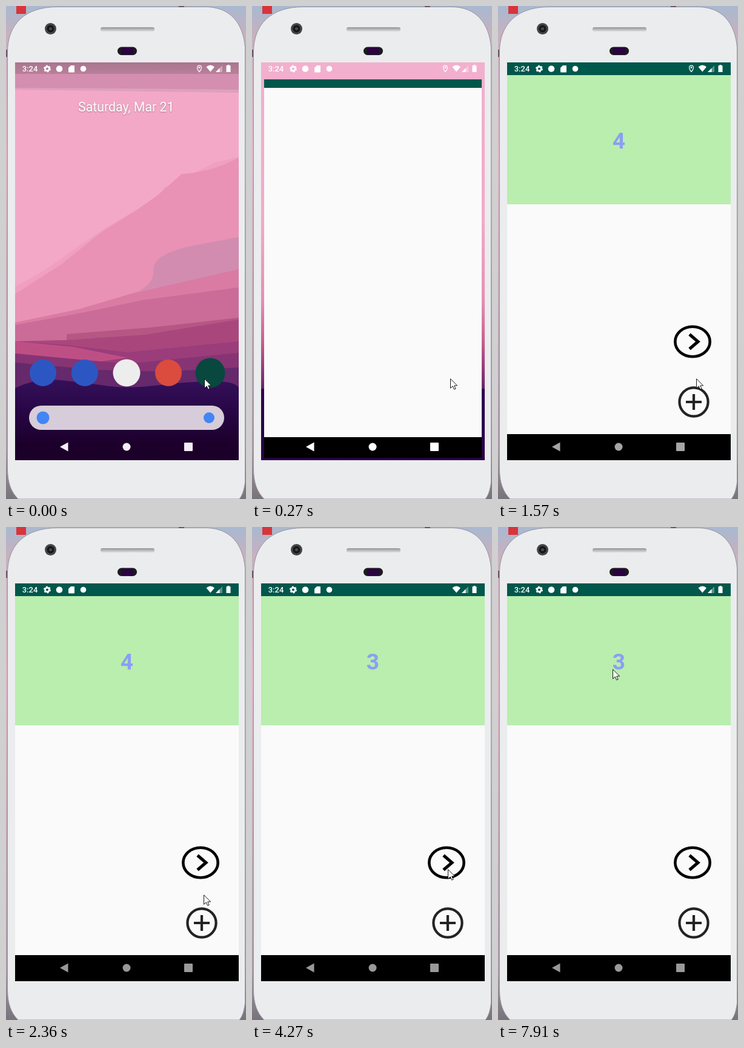
An HTML page for the animation above (8 s loop, 396 by 813 pixels).

```html
<!DOCTYPE html>
<html lang="en">
<head>
<meta charset="utf-8">
<title>Phone demo</title>
<style>
  html, body { margin: 0; width: 100%; height: 100%; overflow: hidden; }
  svg { display: block; width: 396px; height: 813px; }
  text { font-family: Roboto, sans-serif; }
</style>
</head>
<body>
<svg viewBox="0 0 396 813">
  <defs>
    <linearGradient id="outside" x2="0" y2="1">
      <stop offset="0" stop-color="#a8b9d0"/><stop offset=".06" stop-color="#c8b0bf"/>
      <stop offset=".3" stop-color="#dcb7c7"/><stop offset=".9" stop-color="#a99aa5"/>
      <stop offset="1" stop-color="#77737b"/>
    </linearGradient>
    <linearGradient id="speaker" x2="0" y2="1">
      <stop offset="0" stop-color="#929297"/><stop offset=".5" stop-color="#b9b9bd"/>
      <stop offset="1" stop-color="#dedee1"/>
    </linearGradient>
    <linearGradient id="ground" x2="0" y2="1">
      <stop offset="0" stop-color="#35105a"/><stop offset=".45" stop-color="#260542"/>
      <stop offset=".8" stop-color="#1c002b"/><stop offset="1" stop-color="#1b0029"/>
    </linearGradient>
    <linearGradient id="scrim" x2="0" y2="1">
      <stop offset="0" stop-color="#a87590"/><stop offset="1" stop-color="#b98099"/>
    </linearGradient>
    <linearGradient id="plain" x2="0" y2="1">
      <stop offset="0" stop-color="#f2b0ce"/><stop offset=".4" stop-color="#f3a9c8"/>
      <stop offset=".6" stop-color="#e48fb3"/><stop offset=".7" stop-color="#c9608f"/>
      <stop offset=".8" stop-color="#7c2c70"/><stop offset=".819" stop-color="#63266b"/>
      <stop offset=".822" stop-color="#2c0651"/><stop offset="1" stop-color="#260143"/>
    </linearGradient>
    <clipPath id="screen"><rect x="15" y="93" width="369" height="656"/></clipPath>
  </defs>

  <!-- phone body -->
  <rect width="396" height="813" fill="url(#outside)"/>
  <rect x="17" width="16" height="13" fill="#d8343c"/>
  <path d="M20 813C8 801 3 786 2.500 765V75C3 31 30 1.500 85 1.500H330C370 2 391 28 394.500 68V785C393 798 390 807 385 813Z"
        fill="#ebecee" stroke="#96939b"/>
  <path d="M285 0h9v2h-9z" fill="#6d5a68"/>
  <path d="M0 72h2v12h-2z" fill="#6d5a68"/>
  <circle cx="73.500" cy="37.500" r="9.500" fill="#444448"/>
  <circle cx="73.500" cy="37.500" r="6" fill="#17171a"/>
  <circle cx="73.500" cy="37.500" r="2.500" fill="#454950"/>
  <rect x="156" y="35" width="89" height="7" rx="3" fill="url(#speaker)"/>
  <rect x="184" y="67.500" width="32" height="13.500" rx="6.700" fill="#1b1b1e"/>
  <rect x="190" y="69" width="20" height="10.500" rx="2" fill="#2b0340"/>

  <g clip-path="url(#screen)">
    <g id="home">
      <path d="M15 93h369v656H15z" fill="#f4a8c7"/>
      <path d="M15 93h369v50L15 138z" fill="#dda0bd"/>
      <path d="M15 93h369v45L200 136 15 135z" fill="#d48eb0"/>
      <path d="M15 93h369v19H15z" fill="url(#scrim)"/>
      <path d="M15 463Q60 440 100 410T200 345 260 300L345 258 384 249V600H15z" fill="#f09fc0"/>
      <path d="M15 475L90 427 160 371 215 337 250 312 290 277Q340 274 384 250V620H15z" fill="#e992b5"/>
      <path d="M384 381L310 395Q243 408 243 435 246 455 220 470L110 505 384 437z" fill="#d28cb0"/>
      <path d="M15 522L120 500 205 475 384 434V620H15z" fill="#da7ba3"/>
      <path d="M15 526L130 505 225 485 384 464V620H15z" fill="#cb6c98"/>
      <path d="M15 553L100 551V541L240 530 384 514V620H15z" fill="#b65684"/>
      <path d="M15 553L100 551 230 542 384 517V630H15z" fill="#a9477d"/>
      <path d="M15 553L100 559 200 571 384 553V630H15z" fill="#9b3d7a"/>
      <path d="M15 553L110 562 200 580 130 590 15 575z" fill="#be4f85"/>
      <path d="M15 573L110 582 200 590 384 572V640H15z" fill="#863474"/>
      <path d="M15 588L150 600 260 603 384 596V640H15z" fill="#65296c"/>
      <path d="M15 630Q50 613 90 617T170 627Q205 631 245 626T330 619 384 629V749H15z" fill="url(#ground)"/>
      <text x="119" y="174" font-size="21.300" fill="#fff" style="text-shadow:0 1px 2px #5558">Saturday, Mar 21</text>
      <circle cx="61" cy="605" r="22" fill="#2c57c2"/>
      <circle cx="130" cy="605" r="22" fill="#2c57c2"/>
      <circle cx="199" cy="605" r="22.500" fill="#ededee"/>
      <circle cx="268" cy="605" r="22" fill="#db4b3e"/>
      <circle cx="337" cy="605" r="24.500" fill="#08483f"/>
      <rect x="38" y="659" width="322" height="40" rx="20" fill="#d7ccd9"/>
      <circle cx="61" cy="679" r="10.500" fill="#4285f4"/>
      <circle cx="335" cy="679" r="9" fill="#4285f4"/>
    </g>

    <g id="launch">
      <path d="M15 93h369v656H15z" fill="url(#plain)"/>
      <rect id="window" fill="#fafafa"/>
      <rect id="windowTop" fill="#00574b"/>
      <rect id="windowNav"/>
    </g>

    <g id="app">
      <path d="M15 93h369v21H15z" fill="#00574b"/>
      <path d="M15 114h369v592H15z" fill="#fafafa"/>
      <path d="M15 706h369v43H15z"/>
      <g id="card">
        <path d="M15 114h369v213H15z" fill="#b9eeae"/>
        <text id="count" x="199.300" y="235" font-size="37" font-weight="700" text-anchor="middle" fill="#8b9ff2"></text>
      </g>
      <g id="buttons" fill="none">
        <ellipse cx="321" cy="553.500" rx="28.700" ry="24.800" stroke="#000" stroke-width="4.600"/>
        <path d="M316 541.500L330 553.500 316 565.500" stroke="#000" stroke-width="5"/>
        <circle cx="323" cy="653" r="23.600" stroke="#232323" stroke-width="4.200"/>
        <path d="M310 653h26M323 640v26" stroke="#232323" stroke-width="4.200"/>
      </g>
    </g>

    <g fill="#fff">
      <text x="26.700" y="108" font-size="13" font-weight="500">3:24</text>
      <circle cx="68" cy="103.500" r="3.400" fill="none" stroke="#fff" stroke-width="2.800"/>
      <circle cx="68" cy="103.500" r="5" fill="none" stroke="#fff" stroke-width="2" stroke-dasharray="2.600 2.636"/>
      <circle cx="88" cy="103.500" r="5.300"/>
      <path d="M107 98h5q1 0 1 1v9.500q0 1-1 1h-8q-1 0-1-1V102z"/>
      <circle cx="127.500" cy="103.500" r="4.800"/>
      <path id="pin" fill-rule="evenodd" d="M319 109.500C316 106 315 104 315 101.500a4 4 0 0 1 8 0C323 104 322 106 319 109.500zM319 107.500C321 105 321.800 103.500 321.800 101.500a2.800 2.800 0 0 0-5.600 0C316.200 103.500 317 105 319 107.500zM317.600 101.500a1.400 1.400 0 1 1 2.800 0 1.400 1.400 0 1 1-2.800 0z"/>
      <path d="M330.500 100.500Q337.300 94.500 344 100.500L337.300 108.500z"/>
      <path d="M346 109L357 98V109z" opacity=".35"/>
      <path d="M346 109L352.500 102.500V109z"/>
      <path d="M365.500 97h3v1.300h2V109h-7V98.300h2z"/>
    </g>
    <g id="nav">
      <path d="M89 727L102.500 719.500V734.500z"/>
      <circle cx="199" cy="727" r="6.500"/>
      <rect x="294" y="720" width="14" height="14" rx="1"/>
    </g>
  </g>

  <path id="cursor" d="M.5 .8V16.300L4.200 12.900 6.700 18.300 9.100 17.200 6.700 12H11.600z" fill="#fff" stroke="#000" stroke-width=".9"/>
</svg>

<script>
const LOOP = 8000;
const el = id => document.getElementById(id);

// Each entry: start time, then the values held until the next entry.
const cursorSteps = [
  [0, 327, 614], [2360, 326, 606], [2510, 326, 594], [2630, 325, 577], [2750, 324, 565],
  [2900, 324, 564], [3330, 323, 564], [5480, 323, 561], [6010, 211, 309], [6160, 209, 261],
  [6310, 203, 254], [6460, 197, 244], [6710, 217, 269], [6860, 290, 485], [6980, 322, 615],
  [7130, 318, 590], [7250, 294, 505], [7370, 246, 383], [7490, 204, 290], [7610, 187, 245],
  [7770, 187, 254], [7910, 189, 234]
];
const windowSteps = [[120, 33, 150, 332, 570], [270, 20, 121, 359, 624], [420, 16, 100, 367, 648]];
const navSteps = [[0, '#f3eef5'], [270, '#fff'], [1180, '#c8c8c8'], [1450, '#b2b2b2'], [1570, '#a6a6a6'], [1690, '#999']];
const slideSteps = [[0, 0], [3760, 369], [3880, 275], [4000, 181], [4120, 87], [4270, 0]];

const held = (steps, t) => (steps.findLast(s => s[0] <= t) || steps[0]).slice(1);
const show = (id, on) => el(id).style.display = on ? '' : 'none';

function placeRect(id, x, y, width, height) {
  for (const [name, value] of Object.entries({ x, y, width, height })) el(id).setAttribute(name, value);
}

function draw(t) {
  show('home', t < 120);
  show('launch', t >= 120 && t < 540);
  show('app', t >= 540);
  show('card', t >= 1570);
  show('buttons', t >= 1570);
  show('pin', t < 1840);

  const [x, y, w, h] = held(windowSteps, t);
  placeRect('window', x, y, w, h);
  placeRect('windowTop', x, y, w, 14);
  placeRect('windowNav', x, y + h - 34, w, 34);

  el('count').textContent = t < 3760 ? 4 : 3;
  el('card').setAttribute('transform', `translate(${held(slideSteps, t)[0]})`);
  el('nav').setAttribute('fill', held(navSteps, t)[0]);
  el('cursor').setAttribute('transform', `translate(${held(cursorSteps, t)})`);
}

const start = performance.now();
function tick() {
  draw((performance.now() - start) % LOOP);
  requestAnimationFrame(tick);
}
tick();
</script>
</body>
</html>
```
